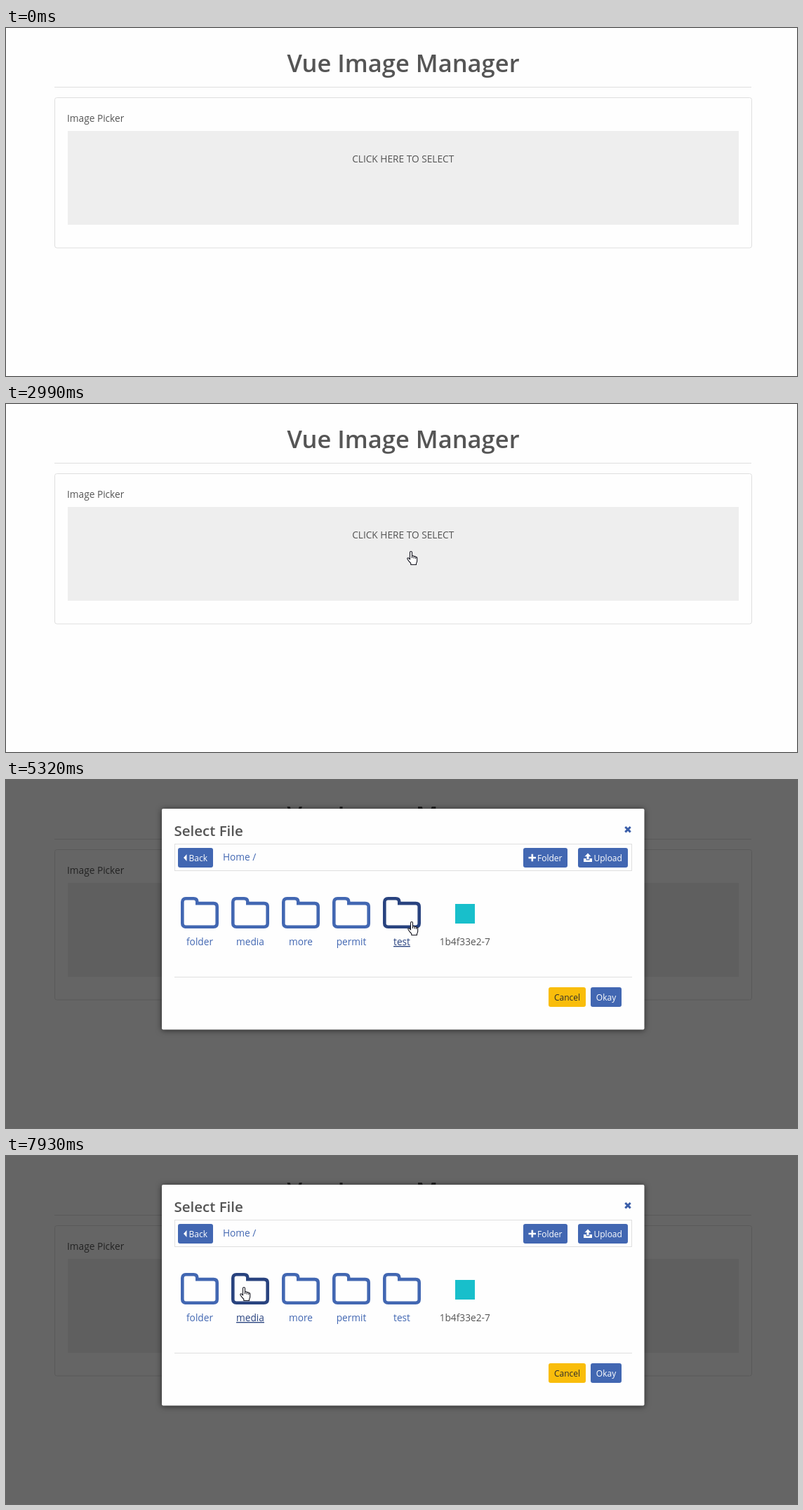
These frames come from a looping animation (1127x497 px, 8 s). An HTML page:

```html
<!DOCTYPE html>
<html lang="en">
<head>
<meta charset="utf-8">
<title>Vue Image Manager</title>
<style>
html, body { margin: 0; width: 100%; height: 100%; overflow: hidden; background: #fefefe; }
svg { display: block; width: 100%; height: 100%; font: 13.7px "Open Sans", "Noto Sans", sans-serif; fill: #555; }
.mid { text-anchor: middle; }
.bold { font-weight: 600; }
.line { fill: none; stroke: #dfdfdf; }
.blue, .item { fill: #4267b2; }
.item path { fill: none; stroke: #4267b2; stroke-width: 4.6; }
.item.hover { fill: #29437f; text-decoration: underline; }
.item.hover path { stroke: #29437f; }
.button { font-size: 12px; fill: #fff; }
.icon { fill: none; stroke: #fff; stroke-width: 2.6; }
.panel { fill: #fefefe; filter: drop-shadow(0 1px 4px rgba(0, 0, 0, .6)); }
.cursor { fill: #fff; stroke: #15151f; stroke-width: 1.1; stroke-linejoin: round; }
</style>
</head>
<body>
<svg viewBox="0 0 1127 497">
  <text class="mid bold" x="566" y="63" font-size="34.5">Vue Image Manager</text>
  <path class="line" d="M69 84.5H1062"/>
  <rect class="line" x="69.5" y="99.5" width="993" height="214.5" rx="3"/>
  <text x="87" y="134">Image Picker</text>
  <rect x="88" y="147" width="956" height="134" fill="#eee"/>
  <text class="mid" x="565.7" y="191.5">CLICK HERE TO SELECT</text>

  <g id="modal">
    <rect width="1127" height="497" fill="#000" opacity=".6"/>
    <rect class="panel" x="222" y="41" width="687.5" height="315.5" rx="2"/>
    <text class="bold" x="239.5" y="80" font-size="20.5">Select File</text>
    <path d="M882.3 67l7.4 7.4m0-7.4l-7.4 7.4" fill="none" stroke="#3b5ea9" stroke-width="3"/>
    <rect class="line" x="240.5" y="91.5" width="651" height="38"/>
    <g class="blue">
      <text x="309" y="115">Home /</text>
      <rect x="245" y="97" width="50" height="28" rx="3"/>
      <rect x="737" y="97" width="63" height="28" rx="3"/>
      <rect x="815" y="97" width="71" height="28" rx="3"/>
      <rect x="833" y="296" width="44" height="28" rx="3"/>
    </g>
    <rect x="773" y="296" width="53" height="28" rx="3" fill="#f9bd0b"/>
    <g class="button">
      <path d="M253 111l4.5-5v10z"/>
      <text x="260.5" y="115.5">Back</text>
      <path class="icon" d="M744.5 111h10.5m-5.2-5.2v10.4"/>
      <text x="757" y="115.5">Folder</text>
      <path d="M829 104.5l4.5 4.7h-3v4h-3v-4h-3zM823 112h3.5v2.5h5V112h3.5v5h-12z"/>
      <text x="837.5" y="115.5">Upload</text>
      <text class="mid" x="855" y="315">Okay</text>
      <text class="mid" x="799.5" y="315" fill="#2b2b2b">Cancel</text>
    </g>
    <path class="line" d="M240 281.5H892"/>
    <g id="items"></g>
    <rect id="logo" x="640" y="177" width="28" height="28" fill="#18bfcb"/>
    <text class="mid" x="653.7" y="236">1b4f33e2-7</text>
  </g>

  <g id="cursor" class="cursor">
    <path id="arrow" d="M.5 .5V14.7L3.8 11.7 6 16.9 8.3 15.9 6.1 10.8H10.4Z"/>
    <g id="hand" transform="translate(-6)">
      <path d="M4.5 12V2a1.5 1.5 0 0 1 3 0V7q2.4-.9 2.7.7 2.2-.6 2.5.8 2-.3 2 1.5v4q0 2-1.2 3.5v2H5.8v-2Q3 15 1 11.5.4 9.5 2.2 9.8 3.5 10.5 4.5 12Z"/>
      <path d="M7.5 7v3M10.2 8v2.5M12.7 9v2" fill="none"/>
    </g>
  </g>
</svg>
<script>
const $ = id => document.getElementById(id);
const LOOP = 8000, STEP = 78, OPEN = 4220, LOGO = 4540;

const names = ["folder", "media", "more", "permit", "test"];
$("items").innerHTML = names.map((name, i) => `<g class="item" transform="translate(${249 + 72 * i} 167)">
  <path d="M2.3 7.3q0-5 5-5h11q5 0 5 5v1.8h23.4q5 0 5 5V37.7q0 5-5 5H7.3q-5 0-5-5z"/>
  <text class="mid" x="27" y="69">${name}</text></g>`).join("");
const items = [...$("items").children];

// Cursor moves: start time, number of steps, end x, end y, ease-out power
const start = [1053, 512];
const moves = [
  [1050, 7, 864, 381, 1.3],
  [1980, 11, 607, 236, 1.34],
  [2830, 4, 571, 205, 1.3],
  [5320, 1, 578, 202, 1],
  [5400, 4, 789, 195, 1.3],
  [6250, 3, 630, 130, 1],
  [6480, 3, 469, 155, 1],
  [6710, 5, 296, 182, 1.3],
  [7090, 2, 284, 182, 1],
  [7470, 7, 339, 187, 1.2]
];

function cursorAt(t) {
  let [x, y] = start;
  for (const [t0, steps, toX, toY, power] of moves) {
    if (t < t0) break;
    const k = Math.min(steps, Math.floor((t - t0) / STEP + 1.2));
    const e = 1 - (1 - k / steps) ** power;
    x += (toX - x) * e;
    y += (toY - y) * e;
  }
  return [x, y];
}

const show = (id, on) => $(id).setAttribute("visibility", on ? "visible" : "hidden");
const inside = (x, y, left, top, w, h) => x >= left && x < left + w && y >= top && y < top + h;

function draw(now) {
  const t = now % LOOP, open = t >= OPEN;
  const [x, y] = cursorAt(t);
  const over = items.map((_, i) => open && inside(x, y, 249 + 72 * i, 167, 54, 72));
  items.forEach((item, i) => item.classList.toggle("hover", over[i]));
  const hand = open ? over.includes(true) : inside(x, y, 88, 147, 956, 134);
  show("modal", open);
  show("logo", t >= LOGO);
  show("arrow", !hand);
  show("hand", hand);
  $("cursor").setAttribute("transform", `translate(${Math.round(x)} ${Math.round(y)})`);
  requestAnimationFrame(draw);
}
draw(performance.now());
</script>
</body>
</html>
```
